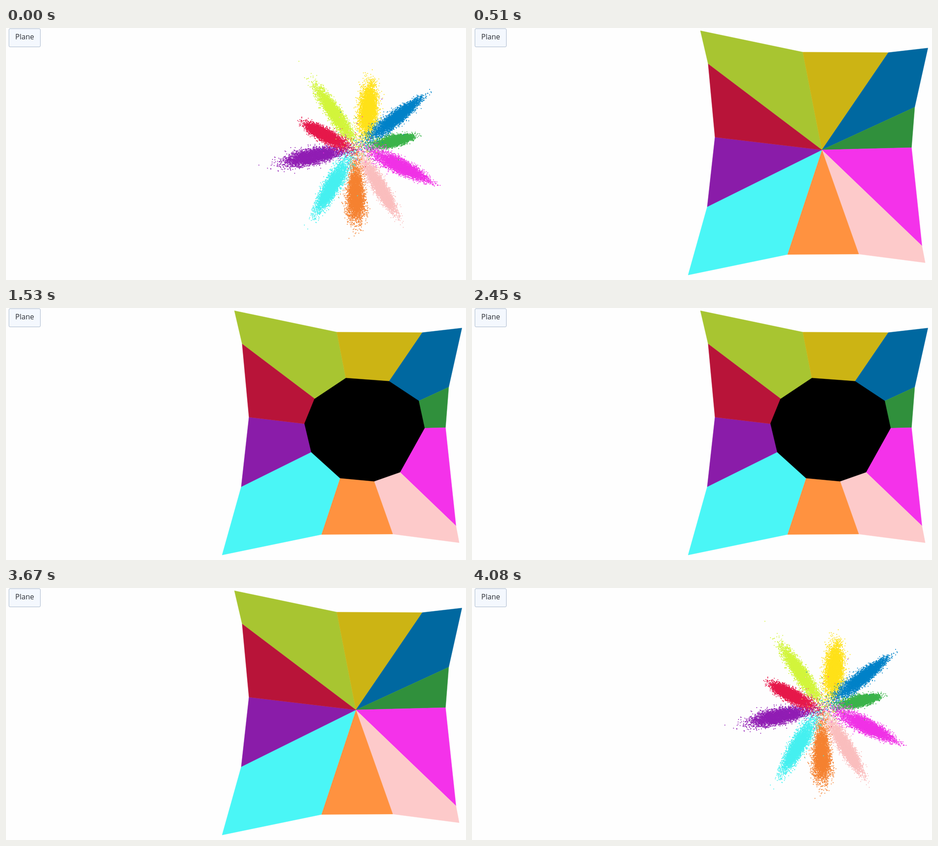
These frames come from a looping animation (1011 by 554 pixels, 4590 ms). An HTML page with a canvas:

```html
<!DOCTYPE html>
<html lang="en">
<head>
<meta charset="utf-8">
<title>Plane</title>
<style>
  html, body { margin: 0; width: 100%; height: 100%; overflow: hidden; background: #fefefe; }
  canvas { position: absolute; left: 0; top: 0; }
  .button {
    position: absolute; left: 6px; top: 1px; width: 70px; height: 41px; box-sizing: border-box;
    border: 1px solid #a8b8cc; border-radius: 3px; background: #f4f8fe; color: #2b2e35;
    font: 16px/34px "Open Sans", sans-serif; text-align: center;
  }
</style>
</head>
<body>
<script>
const LOOP = 4590, STEP = 510, DOTS = 5000;
const center = [769, 268];

// Clockwise from the upper left.
// dots: colour, inner and outer end, half width, taper and skew of the cloud.
// area: colour, shared inner corner, then outer edge up to the next sector.
const sectors = [
  { dots: ['#d2f53c', 761, 245, 683, 130, 14, .05, .02], area: ['#a8c531', [678, 200], [519, 79], [502, 6]] },
  { dots: ['#ffe119', 791, 240, 801, 120, 20, .05, .03], area: ['#ccb414', [747, 154], [727, 53]] },
  { dots: ['#0082c8', 806, 238, 914, 153, 14, .16, .06], area: ['#0068a0', [842, 161], [915, 54], [1002, 44]] },
  { dots: ['#3cb44b', 816, 257, 897, 238, 11, .12, .06], area: ['#30903c', [907, 204], [973, 174]] },
  { dots: ['#f032e6', 811, 276, 930, 335, 15, .14, .06], area: ['#f432ea', [920, 264], [966, 263]] },
  { dots: ['#fabebe', 786, 290, 858, 411, 14, .08, .06], area: ['#fdcaca', [866, 361], [989, 479], [996, 516]] },
  { dots: ['#f58231', 768, 305, 769, 430, 18, -.1, .05], area: ['#ff9240', [809, 381], [850, 497]] },
  { dots: ['#46f0f0', 748, 293, 683, 405, 16, .08, .04], area: ['#4af6f6', [734, 374], [693, 498], [475, 543]] },
  { dots: ['#911eb4', 738, 270, 615, 294, 16, -.06, 0], area: ['#8a1ca9', [671, 317], [517, 393]] },
  { dots: ['#e6194b', 742, 257, 656, 211, 13, .06, .05], area: ['#b81439', [656, 254], [534, 240]] },
];

let seed = 7;
function random() {
  seed = (seed * 1664525 + 1013904223) >>> 0;
  return (seed + 1) / 4294967297;
}
function gauss() {
  return Math.sqrt(-2 * Math.log(random())) * Math.cos(2 * Math.PI * random());
}

function addLayer() {
  const canvas = document.createElement('canvas');
  canvas.width = 1011;
  canvas.height = 554;
  document.body.append(canvas);
  return canvas.getContext('2d');
}

function dot(g, x, y) {
  g.fillRect(x - .9, y - .9, 1.8, 1.8);
}

function drawCloud(g, [color, x0, y0, x1, y1, half, taper, skew]) {
  const dx = x1 - x0, dy = y1 - y0, length = Math.hypot(dx, dy);
  g.fillStyle = color;
  for (let i = 0; i < DOTS; i++) {
    const a = gauss();
    const along = .5 + (a - skew * a * a) / 4.2;
    const across = gauss() * half / 2.1 * Math.max(.2, 1 - taper * a) / length;
    dot(g, x0 + dx * along - dy * across, y0 + dy * along + dx * across);
  }
}

function drawStrays(g, { dots: [color, x, y] }) {
  g.fillStyle = color;
  for (let i = 0; i < 14; i++) {
    dot(g, (x + center[0]) / 2 + gauss() * 17, (y + center[1]) / 2 + gauss() * 13);
  }
  for (let i = 0; i < 4; i++) {
    dot(g, center[0] + 5 + gauss() * 45, center[1] - 10 + gauss() * 40);
  }
}

function fillShape(g, color, points) {
  g.beginPath();
  points.forEach(p => g.lineTo(...p));
  g.closePath();
  g.fillStyle = g.strokeStyle = color;
  g.lineWidth = .5;
  g.fill();
  g.stroke();
}

function drawAreas(g) {
  sectors.forEach(({ area: [color, , ...edge] }, i) => {
    const next = sectors[(i + 1) % sectors.length].area[2];
    fillShape(g, color, [center, ...edge, next]);
  });
}

const cloud = addLayer(), full = addLayer(), holed = addLayer();
sectors.forEach(s => drawCloud(cloud, s.dots));
sectors.forEach(s => drawStrays(cloud, s));
drawAreas(full);
drawAreas(holed);
fillShape(holed, '#000', sectors.map(s => s.area[1]));

function frame(now) {
  const step = Math.floor(now % LOOP / STEP);
  const shown = step < 1 || step > 7 ? cloud : step < 3 || step > 5 ? full : holed;
  for (const layer of [cloud, full, holed]) {
    layer.canvas.style.visibility = layer === shown ? 'visible' : 'hidden';
  }
  requestAnimationFrame(frame);
}
frame(performance.now());
</script>
<div class="button">Plane</div>
</body>
</html>
```
